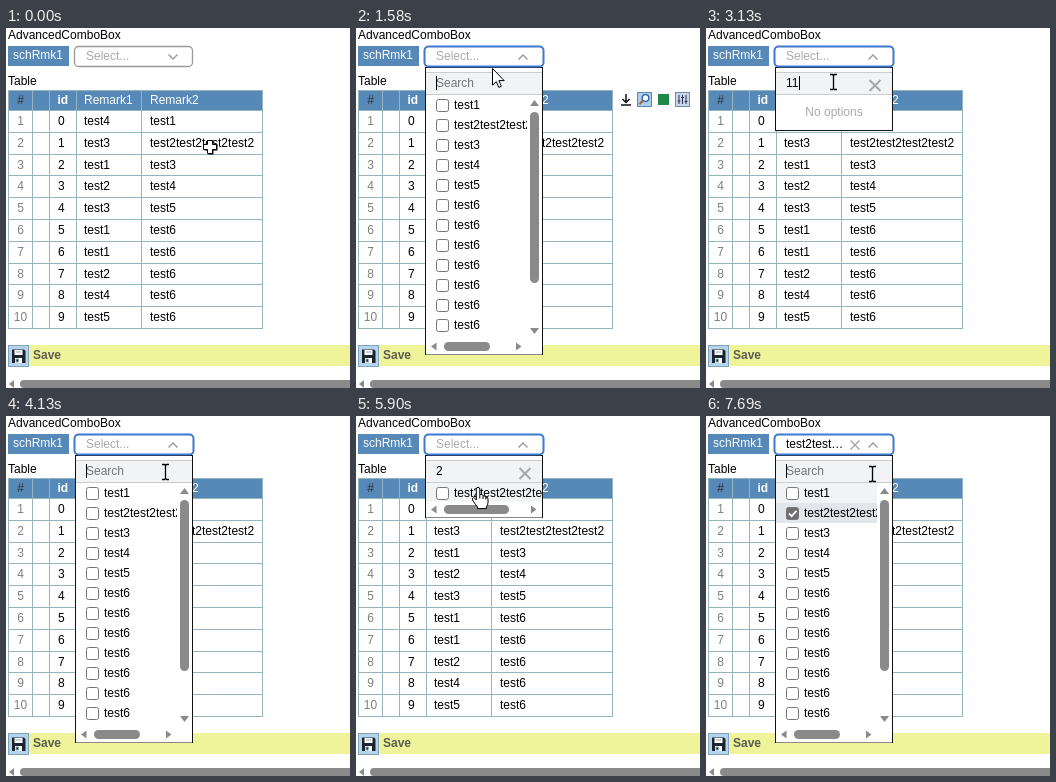
Recreate the animation shown at these times as an HTML page. Size 344 by 360 pixels, loop 8000 ms.

```html
<!DOCTYPE html>
<html lang="en">
<head>
<meta charset="utf-8">
<title>AdvancedComboBox</title>
<style>
html, body { margin: 0; width: 100%; height: 100%; overflow: hidden; background: #fff; }
svg { display: block; width: 344px; height: 360px; font: 12px "Liberation Sans", Arial, sans-serif; }
text { white-space: pre; }
</style>
</head>
<body>
<svg viewBox="0 0 344 360">
  <defs>
    <clipPath id="clipNarrow"><rect x="70" y="67" width="101" height="242"/></clipPath>
    <clipPath id="clipWide"><rect x="70" y="67" width="116" height="242"/></clipPath>
    <g id="cross">
      <path d="M-1.5-5.5h5v4h4v5h-4v4h-5v-4h-4v-5h4z" fill="#000"/>
      <path d="M-2.5-6.5h5v4h4v5h-4v4h-5v-4h-4v-5h4z" fill="#fff" stroke="#000"/>
    </g>
    <path id="arrow" d="M.5.5V17.2L4.3 13.6 6.8 19.4 9.3 18.3 6.9 12.6H12.2Z" fill="#fff" stroke="#000"/>
    <g id="beam" fill="none">
      <path d="M-3.5-7.5H-1L0-6.5 1-7.5H3.5M0-6.5V6.5M-3.5 7.5H-1L0 6.5 1 7.5H3.5" stroke="#000" stroke-width="1.3"/>
    </g>
    <path id="hand" d="M-1.7 2Q-1.7.3 0 .3T1.8 2V7.6Q4.8 6.6 5 8.9 7.6 8 7.8 10.3 10 9.7 10 12V15.5Q10 18 8.3 20V21.6H-.5V20Q-2.6 17.6-5.4 13.2-6.2 11-4.6 10.7-3.3 10.6-1.7 13ZM1.8 7.6V11.5M5 8.9V12M7.8 10.3V12.5" fill="#fff" stroke="#000" stroke-linejoin="round"/>
  </defs>
  <text x="2" y="11">AdvancedComboBox</text>
  <rect x="2" y="18" width="61" height="20" fill="#5688b8"/>
  <text x="7" y="31" fill="#fff">schRmk1</text>
  <text x="2" y="57">Table</text>
  <g id="table"></g>
  <g id="tools">
    <path d="M270 66v8M266.5 71l3.5 3.5 3.5-3.5M265 77h10" fill="none" stroke="#111" stroke-width="1.5"/>
    <rect x="281.500" y="64.500" width="14" height="14" fill="#a9d0f0" stroke="#5688b8"/>
    <circle cx="289.500" cy="70" r="3.300" fill="#fff" stroke="#2d5c96" stroke-width="1.300"/>
    <path d="M287 72.500l-3.500 3.800" stroke="#a5622c" stroke-width="2"/>
    <rect x="302" y="66" width="11" height="11" fill="#21864a"/>
    <rect x="319.500" y="64.500" width="14" height="14" fill="#cbd5ec" stroke="#7089b0"/>
    <path d="M323 67v9M326.500 67v9M330 67v9M321.500 73h3M325 69.500h3M328.500 73.500h3" stroke="#26354f"/>
  </g>
  <rect x="22" y="317" width="322" height="21" fill="#eff39a"/>
  <rect x="2.500" y="317.500" width="20" height="21" fill="#b5d4ea" stroke="#7ba3bd"/>
  <path d="M6 321.500h12l1.500 1.500v12H6z" fill="#1c2430"/>
  <path d="M8.500 322h8v5h-8zM9 330h7v5H9z" fill="#fff"/>
  <path d="M10 331h2.500v3H10zM10 324h5" fill="#1c2430" stroke="#8aa"/>
  <text x="27" y="331" font-weight="bold" fill="#5c5c50">Save</text>
  <path d="M8 352v8l-5-4z" fill="#8a8a8a"/>
  <rect x="14" y="352" width="345" height="8" rx="4" fill="#8a8a8a"/>
  <g id="popup"></g>
  <g id="combo"></g>
  <use id="cursor"/>
</svg>
<script>
const $ = id => document.getElementById(id);
const LOOP = 8000;
const LONG = "test2".repeat(4);
const OPTIONS = ["test1", LONG, "test3", "test4", "test5", ...Array(7).fill("test6")];

const text = (x, y, s, fill = "#000", more = "") => `<text x="${x}" y="${y}" fill="${fill}" ${more}>${s}</text>`;
const box = (x, y, w, h, fill, more = "") => `<rect x="${x}" y="${y}" width="${w}" height="${h}" fill="${fill}" ${more}/>`;
const line = (d, color, width = 1) => `<path d="${d}" fill="none" stroke="${color}" stroke-width="${width}"/>`;
const shape = d => `<path d="${d}" fill="#8a8a8a"/>`;
const cross = (x, y, r, w) =>
  line(`M${x - r} ${y - r}l${2 * r} ${2 * r}m0 ${-2 * r}l${-2 * r} ${2 * r}`, "#a6a6a6", w);

function drawTable() {
  const first = [4, 3, 1, 2, 3, 1, 1, 2, 4, 5], second = [1, 0, 3, 4, 5, 6, 6, 6, 6, 6];
  let out = box(2, 62, 255, 20, "#5688b8");
  out += text(14.5, 76, "#", "#333", 'text-anchor="middle"') + text(51.5, 76, "id", "#fff", 'font-weight="bold"');
  out += text(78, 76, "Remark1", "#fff") + text(144, 76, "Remark2", "#fff");
  let grid = "M2 62.5H257";
  for (let i = 0; i <= 10; i++) {
    const y = Math.round(82 + i * 21.8);
    grid += `M2 ${y + .5}H257`;
    if (i === 10) break;
    out += text(14.5, y + 15, i + 1, "#808080", 'text-anchor="middle"') + text(52, y + 15, i);
    out += text(78, y + 15, "test" + first[i]) + text(144, y + 15, second[i] ? "test" + second[i] : LONG);
  }
  for (const x of [2.5, 26.5, 43.5, 70.5, 135.5, 256.5]) grid += `M${x} 62V300`;
  $("table").innerHTML = out + line(grid, "#92b5be");
}

// value of the last [time, value] pair already reached
const at = (track, t) => track.filter(k => k[0] <= t).pop()[1];

const QUERY = [[0, ""], [2210, "1"], [2840, "11"], [4130, ""], [5110, "2"], [7550, ""]];
const LIST = [[0, ""], [1260, "all"], [2510, "one"], [3130, "none"], [4130, "all"], [5320, "long"], [7620, "all"]];
const CARET = [[0, 0], [1260, 1], [1720, 0], [2210, 1], [3430, 0], [4130, 1], [4670, 0], [5110, 1], [5660, 0], [7550, 1]];

// start, end, steps, pointer, x, y
const MOVES = [
  [0, 0, 1, "cross", 204, 119],
  [520, 720, 4, "cross", 167, 71],
  [790, 930, 3, "arrow", 139, 35],
  [1580, 1580, 1, "arrow", 136, 40],
  [1640, 1720, 2, "arrow", 114, 42],
  [1870, 1870, 1, "beam", 127, 53.5],
  [3190, 3190, 1, "beam", 134, 52],
  [3740, 3820, 2, "beam", 150, 54],
  [3900, 3980, 2, "hand", 159, 57],
  [4130, 4130, 1, "beam", 159, 56],
  [4520, 4520, 1, "", 159, 56],
  [4670, 4670, 1, "beam", 164, 59],
  [4730, 4730, 1, "beam", 162, 56],
  [5660, 5720, 2, "beam", 150, 61],
  [5780, 5900, 3, "hand", 122, 71],
  [5980, 6100, 2, "hand", 86, 77],
  [6400, 6810, 6, "hand", 118, 79],
  [6990, 6990, 1, "hand", 130, 72],
  [7050, 7050, 1, "hand", 141, 62],
  [7110, 7370, 5, "hand", 166, 56],
  [7690, 7690, 1, "beam", 166, 57.5]
];

function pointer(t) {
  let i = MOVES.length - 1;
  while (MOVES[i][0] > t) i--;
  const [start, end, steps, kind, x, y] = MOVES[i];
  const [px, py] = i ? MOVES[i - 1].slice(4) : [x, y];
  const done = end > start ? Math.floor((t - start) / (end - start) * (steps - 1) + 1e-6) + 1 : steps;
  const p = Math.min(1, done / steps);
  return { kind, x: px + (x - px) * p, y: py + (y - py) * p };
}

function option(label, i, fill, checked) {
  const y = 67 + i * 20;
  return box(70, y, 116, 20, fill) +
    box(80.5, y + 4.5, 12, 12, checked ? "#6f6f6f" : "#fff", 'rx="2" stroke="#767676"') +
    (checked ? line(`M83 ${y + 10.5}l2.700 2.700 4.800-5.400`, "#fff", 1.8) : "") +
    text(98, y + 14, label);
}

function hbar(y, width, right) {
  return box(70, y - 8, 116, 16, "#fff") +
    shape(`M80.500 ${y - 4}v8l-5.500-4z`) + shape(`M${right - 3} ${y - 4}v8l5.500-4z`) +
    box(88, y - 4.5, width, 9, "#8a8a8a", 'rx="4.5"');
}

function drawPopup(list, query, caret, focused, hover, checked) {
  if (!list) return "";
  const bottom = { all: 326.5, one: 88.5, none: 102.5, long: 101.5 }[list];
  let out = box(69.5, 39.5, 117, bottom - 39.5, "#fff", 'stroke="#111"');
  out += box(70, 44, 116, 22, focused ? "#f1f3f5" : "#fff") + line("M70 44.5H186M70 66.5H186", "#ccc");
  out += query ? text(80, 59, query) + cross(169, 57.5, 5.5, 2) : text(80, 59, "Search", "#757575");
  if (caret) out += box(80 + Math.round(query.length * 6.67), 48, 1, 14, "#000");
  if (list === "none") return out + text(128, 88, "No options", "#aaa", 'text-anchor="middle"');
  if (list === "one") return out + option("test1", 0, "#fff");
  const fill = checked ? "#e2e6ea" : hover ? "#f1f3f5" : "#fff";
  if (list === "long")
    return out + `<g clip-path="url(#clipWide)">${option(LONG, 0, fill, checked)}</g>` + hbar(93.5, 65, 178);
  const rows = OPTIONS.map((s, i) => {
    const long = s === LONG && checked;
    return option(s, i, long ? "#e2e6ea" : checked && !i ? "#f1f3f5" : "#fff", long);
  });
  return out + `<g clip-path="url(#clipNarrow)">${rows.join("")}</g>` + hbar(318.5, 46, 163) +
    shape("M174 78h9l-4.500-6z") + shape("M174 300h9l-4.500 6z") +
    box(174, 84, 9, 171, "#8a8a8a", 'rx="4.5"');
}

function drawCombo(focused, open, chosen) {
  let out = focused
    ? box(68.5, 18.5, 119, 20, "#fff", 'rx="4" stroke="#3f78d0" stroke-width="2"')
    : box(68.5, 18.5, 118, 20, "#fff", 'rx="4" stroke="#999" stroke-width="1.3"');
  out += chosen ? text(80, 32, "test2test…") + cross(149, 29, 4.5, 1.4) : text(80, 32, "Select...", "#aaa");
  return out + line(open ? "M162.500 31.500l4.500-4.500 4.500 4.500" : "M162.500 26.500l4.500 4.500 4.500-4.500", "#999", 1.4);
}

const shown = {};
function put(id, markup) {
  if (shown[id] !== markup) $(id).innerHTML = shown[id] = markup;
}

function render(t) {
  const c = pointer(t), list = at(LIST, t);
  const focused = t < 6250 || t >= 7550;
  const hover = c.kind === "hand" && c.y > 66;
  put("popup", drawPopup(list, at(QUERY, t), at(CARET, t), focused, hover, t >= 6250));
  put("combo", drawCombo(t >= 1200, list !== "", t >= 6320));
  $("tools").style.display = t >= 520 && t < 2690 ? "" : "none";
  $("cursor").setAttribute("href", "#" + c.kind);
  $("cursor").setAttribute("transform", `translate(${Math.round(c.x) + (c.kind === "beam" ? .5 : 0)} ${Math.round(c.y)})`);
}

drawTable();
const begin = performance.now();
function tick() {
  render((performance.now() - begin) % LOOP);
  requestAnimationFrame(tick);
}
tick();
</script>
</body>
</html>
```
